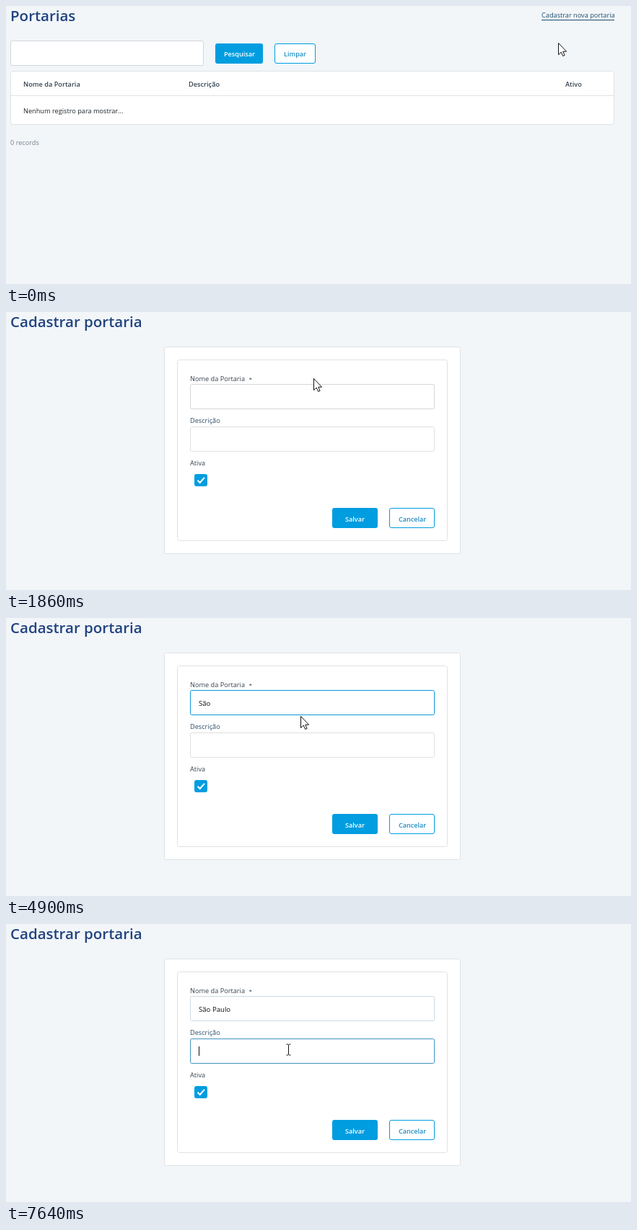
Recreate the animation shown at these times as an HTML page. Size 866 by 386 pixels, loop 8000 ms.

```html
<!DOCTYPE html>
<html lang="pt-BR">
<head>
<meta charset="utf-8">
<title>Portarias</title>
<style>
  html, body { margin: 0; width: 100%; height: 100%; overflow: hidden; background: #f2f6f9; }
  svg { display: block; width: 866px; height: 386px; }
  text { font: 9.2px "Open Sans", "Noto Sans", sans-serif; fill: #36434f; white-space: pre; }
  .title { font-size: 20.5px; font-weight: 600; fill: #22437f; }
  .semi { font-weight: 600; }
  .button { font-weight: 600; font-size: 9.1px; fill: #fff; }
  .hollow { fill: #1b8dc3; }
  .box { fill: #fff; stroke: #dfe2e5; }
  .field { fill: #fff; stroke: #d3d6da; }
  .primary { fill: #009de0; }
  .outline { fill: #fff; stroke: #009de0; }
  .arrow, .hand { fill: #fff; stroke: #111; stroke-linejoin: round; }
</style>
</head>
<body>
<svg viewBox="0 0 866 386">
  <g id="list">
    <text class="title" x="6" y="21">Portarias</text>
    <g id="link">
      <text x="742" y="16" style="fill:inherit">Cadastrar nova portaria</text>
      <rect x="742" y="19" width="101" height="1"/>
    </g>
    <rect class="field" x="6.5" y="48.5" width="267" height="34" rx="2"/>
    <rect class="primary" x="290" y="52" width="66" height="28" rx="3"/>
    <text class="button" x="302" y="70">Pesquisar</text>
    <rect class="outline" x="372.5" y="52.5" width="56" height="27" rx="2.5"/>
    <text class="button hollow" x="385" y="70">Limpar</text>
    <rect class="box" x="6.5" y="90.5" width="836" height="74" rx="3"/>
    <path class="box" d="M7 124.5H842"/>
    <text class="semi" x="24" y="112">Nome da Portaria</text>
    <text class="semi" x="253" y="112">Descrição</text>
    <text class="semi" x="775" y="112">Ativo</text>
    <text x="24" y="149" style="fill:#1d252c">Nenhum registro para mostrar...</text>
    <text x="6" y="193" style="fill:#7a828c">0 records</text>
  </g>

  <g id="form">
    <text class="title" x="6" y="21">Cadastrar portaria</text>
    <rect class="box" x="219.5" y="48.5" width="410" height="287" rx="3"/>
    <rect class="box" x="237.5" y="66.5" width="374" height="251" rx="3"/>
    <text x="255" y="96">Nome da Portaria</text>
    <text x="336.5" y="96" style="font-size:8px">*</text>
    <rect id="name" class="field" x="255.5" y="100.5" width="338" height="34" rx="2"/>
    <text id="typed" x="267" y="122" style="font-size:9.6px;fill:#111"></text>
    <text x="255" y="154" style="fill:#2b4d6b">Descrição</text>
    <rect id="desc" class="field" x="255.5" y="159.5" width="338" height="34" rx="2"/>
    <text x="255" y="213">Ativa</text>
    <rect class="primary" x="261" y="225" width="18" height="17" rx="3"/>
    <path d="M265.5 233.8L268.7 237 275 229.8" fill="none" stroke="#fff" stroke-width="2"/>
    <rect class="primary" x="452" y="272" width="63" height="28" rx="3"/>
    <text class="button" x="470" y="291">Salvar</text>
    <rect class="outline" x="531.5" y="272.5" width="62" height="27" rx="2.5"/>
    <text class="button hollow" x="544" y="291">Cancelar</text>
    <rect id="caret" width="1" height="13" fill="#111"/>
  </g>

  <circle id="click" r="12.2" fill="#ff0" fill-opacity=".5"/>
  <g id="pointer">
    <path id="arrow" class="arrow" d="M.5 .5V16.6L4.2 13.1 6.7 18.5 9.1 17.4 6.7 12.2H11.6Z"/>
    <path id="hand" class="hand" stroke-width="1.2" d="M0 14V2.2Q0 .6 1.7 .6T3.4 2.2V8.2Q5.3 6.8 6.5 8.8 8.2 7.6 9.2 9.6 11.6 9 11.6 11.2V16Q11.6 18.5 9.8 20.5V23H1.2V20.8L-4.3 14.2Q-5 12.2-3.4 11.8-1.8 11.8 0 14ZM3.4 8.2V12M6.5 8.8V12M9.2 9.6V12.5"/>
    <path id="beam" d="M-3 -7.5H-1L0 -6.7 1 -7.5H3M0 -6.7V6.7M-3 7.5H-1L0 6.7 1 7.5H3" fill="none" stroke="#111"/>
  </g>
</svg>
<script>
const $ = id => document.getElementById(id);
const show = (id, on) => $(id).setAttribute("visibility", on ? "inherit" : "hidden");
const within = (t, spans) => spans.some(([a, b]) => t >= a && t < b);
const ease = p => p * p * (3 - 2 * p);

const LOOP = 8000, FORM = 1240, WORD = "São Paulo";
const KEYS = [3190, 4120, 4290, 4530, 4990, 5310, 5460, 5840, 6080];
const CARET = [[2340, 2810], [3360, 3890], [4440, 4900], [5460, 6010], [6540, 7160], [7560, LOOP]];

// start, interval, steps, from, to, curve
const MOVES = [
  [3, 77, 7, [765, 51], [777, 13], ease],
  [1240, 79, 10, [777, 13], [329.5, 114], ease],
  [2640, 1, 1, [408, 136], [408, 136], ease],
  [6865, 75, 3, [408, 136], [398, 151], p => p],
  [7090, 78, 5, [398, 151], [391.5, 174.5], ease]
];
// from, until, x, y
const CLICKS = [[620, 770, 776.5, 13], [2260, 2490, 327, 114], [7480, 7640, 391, 174]];

function pointerAt(t) {
  const [start, gap, steps, a, b, curve] = MOVES.filter(m => t >= m[0]).pop() || MOVES[0];
  const n = Math.max(0, Math.min(steps, Math.floor((t - start) / gap)));
  const p = curve(n / steps);
  return a.map((v, i) => v + (b[i] - v) * p);
}

function nameBorder(t) {
  if (t < 2340) return "#d3d6da";
  if (t < 2410) return "#59a5cc";
  return t < 7560 ? "#0c98d6" : "#cbdbe4";
}

function descBorder(t) {
  if (t < 7560) return "#dcdfe2";
  return t < 7640 ? "#94bed4" : "#3f93c0";
}

function draw(t) {
  const form = t >= FORM;
  show("list", !form);
  show("form", form);

  const [x, y] = pointerAt(t);
  const hand = !form && y < 20;
  const beam = form && x > 255 && x < 594 && (y > 100 && y < 135 || y > 159 && y < 194);
  $("pointer").setAttribute("transform", `translate(${beam ? x : Math.round(x)} ${beam ? y : Math.round(y)})`);
  show("hand", hand);
  show("beam", beam);
  show("arrow", !hand && !beam);
  $("link").setAttribute("fill", hand ? "#4878c4" : "#1f4c6d");

  const click = CLICKS.find(c => within(t, [c]));
  show("click", click);
  if (click) $("click").setAttribute("transform", `translate(${click[2]} ${click[3]})`);

  $("name").style.stroke = nameBorder(t);
  $("desc").style.stroke = descBorder(t);
  $("typed").textContent = WORD.slice(0, KEYS.filter(k => t >= k).length);
  const inDesc = t >= 7560;
  const width = inDesc ? 0 : $("typed").getComputedTextLength();
  $("caret").setAttribute("x", Math.round(267 + width));
  $("caret").setAttribute("y", inDesc ? 170 : 111);
  show("caret", form && within(t, CARET));
}

let begin;
function tick(now) {
  begin ??= now;
  draw((now - begin) % LOOP);
  requestAnimationFrame(tick);
}
draw(0);
requestAnimationFrame(tick);
</script>
</body>
</html>
```
